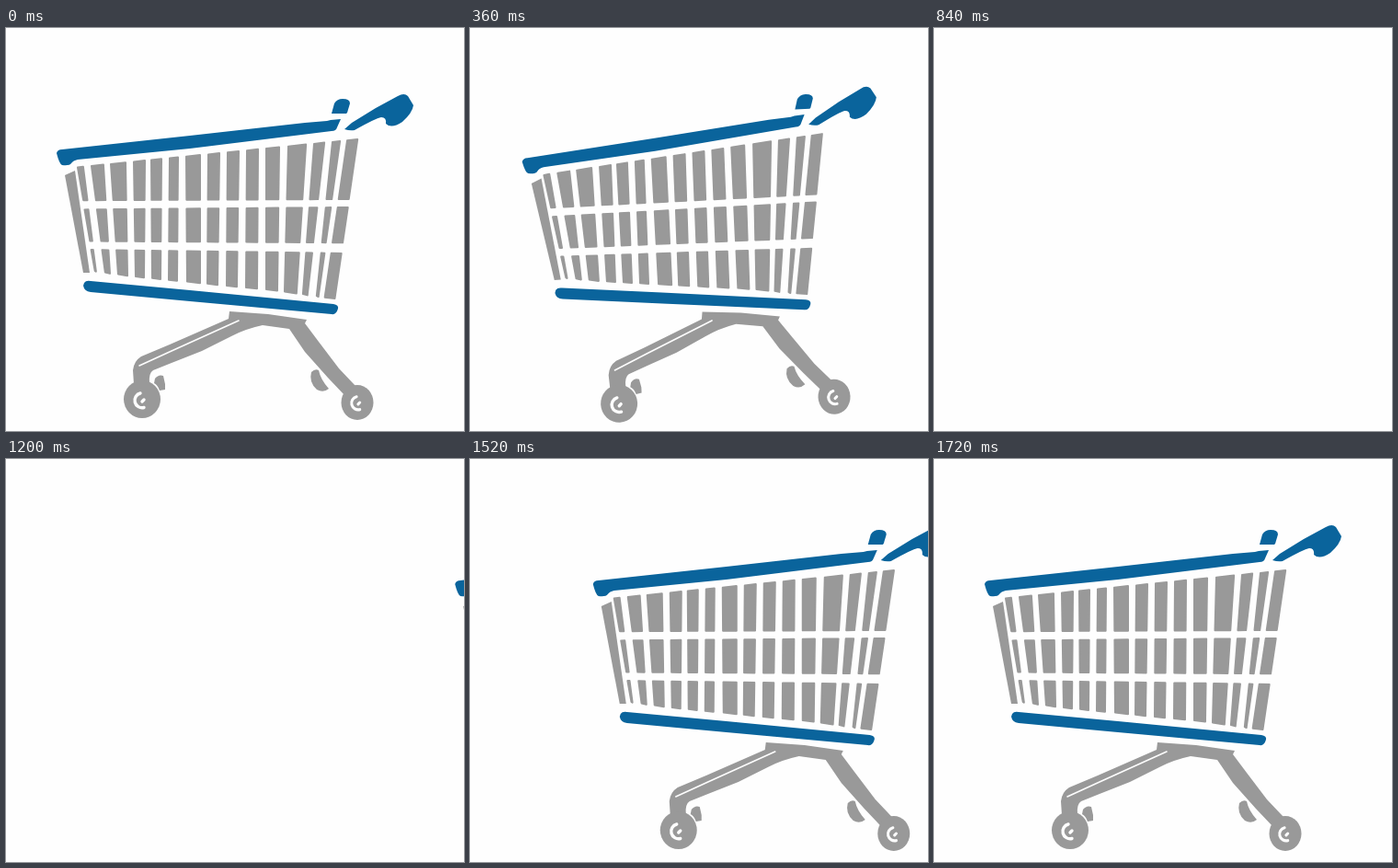
Animation of 498x438 px, one loop 2.08 s. Source, as an HTML page:

```html
<!DOCTYPE html>
<html lang="en">
<head>
<meta charset="utf-8">
<title>Shopping cart</title>
<style>
  html, body { margin: 0; width: 100%; height: 100%; overflow: hidden; background: #fefefe; }
  svg { display: block; width: 498px; height: 438px; }
  .blue { fill: #0a649c; }
  .grey { fill: #999; }
  .light { fill: none; stroke: #fefefe; stroke-linecap: round; }
  #bars { fill: #999; stroke: #999; stroke-width: 2; stroke-linejoin: round; }
  #streaks { fill: #444; }
</style>
</head>
<body>
<svg viewBox="0 0 498 438">
  <defs>
    <g id="hub" class="light">
      <path d="M-1 -7A7.5 7.5 0 1 0 3 8.5" stroke-width="3.4"/>
      <path d="M1 2L3 0" stroke-width="3.4"/>
    </g>
    <g id="streak">
      <path d="M-41 -7Q-40 16 -27 28L-31 28Q-44 18 -41 -7Z"/>
      <path d="M-34 5Q-27 20 -14 27L-19 27Q-32 21 -34 5Z"/>
    </g>
  </defs>
  <g id="cart">
    <g class="blue">
      <path d="M55 136Q56 132 61 132L200 117L325 103L349 101L353 100L364 99L360 108Q359 112 354 112L200 131L78 143Q73 144 71 147Q69 150 61 149Q58 148 55 136Z"/>
      <path d="M354 93L357 82Q360 77 366 77Q374 77 374 82L371 92L370 93Z"/>
      <path d="M368 110L376 103L402 87L426 74Q433 70 437 74L443 84Q442 92 431 102Q419 110 413 104Q414 97 408 97Q402 98 379 111Q374 112 368 110Z"/>
      <path d="M85 277Q87 274 92 275L200 285L356 300Q362 301 361 305Q359 312 354 311L200 297L92 287Q85 286 84 280Z"/>
    </g>
    <path id="bars"/>
    <g class="grey">
      <path d="M64 160L75 155L91 266L84 266Z"/>
      <path d="M243 308L285 311L327 317L325 321L340 341L362 370L380 389L368 399L350 380L325 352L308 327L279 323Q260 327 245 335L213 351L180 364L160 372Q155 375 156 386L139 387L138 372Q139 362 147 357L178 344L242 316Z"/>
      <ellipse cx="148" cy="403.500" rx="20" ry="20.500"/>
      <ellipse cx="382" cy="407" rx="17.500" ry="19"/>
      <path d="M162 381Q166 376 171 378L173 387V393L167 394Q165 388 161 386Z"/>
      <path d="M332 374Q336 370 340 372Q342 382 351 392Q345 397 338 393Q329 385 332 374Z"/>
    </g>
    <path class="light" stroke-width="1.600" d="M145 367L180 351L253 318"/>
    <use href="#hub" x="147" y="404"/>
    <use href="#hub" transform="translate(382 407) scale(.9)"/>
    <g id="streaks">
      <use href="#streak" x="148" y="403"/>
      <use href="#streak" transform="translate(382 409) scale(.85)"/>
    </g>
  </g>
</svg>
<script>
const LOOP = 2080, STEP = 40;
const cart = document.getElementById('cart');
const streaks = document.getElementById('streaks');

// Left and right edge of each bar at the top, then at the bottom of the basket.
const bars = [
  [77, 85, 96, 99], [92, 107, 107, 114], [113, 131, 121, 133],
  [138, 152, 140, 151], [157, 170, 158, 169], [177, 188, 176, 187],
  [195, 212, 196, 212], [219, 233, 218, 231], [240, 254, 239, 252],
  [261, 275, 260, 274], [282, 298, 282, 296], [306, 327, 302, 317],
  [334, 347, 322, 329], [354, 364, 337, 341], [370, 383, 346, 359]
];
const basketTop = x => 158.3 - 0.1 * x;
const basketBottom = x => 257.4 + 0.098 * x;
const rows = [
  [basketTop, x => 188.5 - 0.004 * x],
  [x => 197 - 0.008 * x, x => 232 + 0.006 * x],
  [x => 239 + 0.013 * x, basketBottom]
];

function barPath([topLeft, topRight, bottomLeft, bottomRight], [upper, lower]) {
  const start = basketTop(topLeft), height = basketBottom(bottomLeft) - start;
  const corner = (from, to, edge, dx, dy) => {
    const y = edge(from);
    return `${from + (to - from) * (y - start) / height + dx} ${y + dy}`;
  };
  return 'M' + [
    corner(topLeft, bottomLeft, upper, 1, 1),
    corner(topRight, bottomRight, upper, -1, 1),
    corner(topRight, bottomRight, lower, -1, -1),
    corner(topLeft, bottomLeft, lower, 1, -1)
  ].join('L') + 'Z';
}

document.getElementById('bars').setAttribute('d',
  rows.flatMap(row => bars.map(bar => barPath(bar, row))).join(''));

function leanAmount(t) {
  const p = Math.min(t / 520, 1);
  const s = 1 - (1 - p) ** 2;
  return s * s * (3 - 2 * s);
}

// Constant speed at first, then even braking to a stop.
function distanceLeft(steps) {
  const rate = 3.15, knee = 7.39;
  return steps < knee ? rate * steps ** 2 : rate * knee * (2 * steps - knee);
}

function draw(now) {
  const t = Math.floor(now % LOOP / STEP) * STEP;
  const leaving = t < 840;
  const x = leaving
    ? -110 * (Math.max(0, t - 560) / 120) ** 1.9
    : distanceLeft(Math.max(0, 1720 - t) / STEP);
  const angle = leaving ? -2.75 * leanAmount(t) : 0;
  cart.setAttribute('transform', `translate(${x}) rotate(${angle} 257 104)`);
  cart.style.display = t >= 840 && t < 1200 ? 'none' : '';
  streaks.style.display = t >= 640 && t < 1440 ? '' : 'none';
}

const begin = performance.now();
function tick() {
  draw(performance.now() - begin);
  requestAnimationFrame(tick);
}
tick();
</script>
</body>
</html>
```
